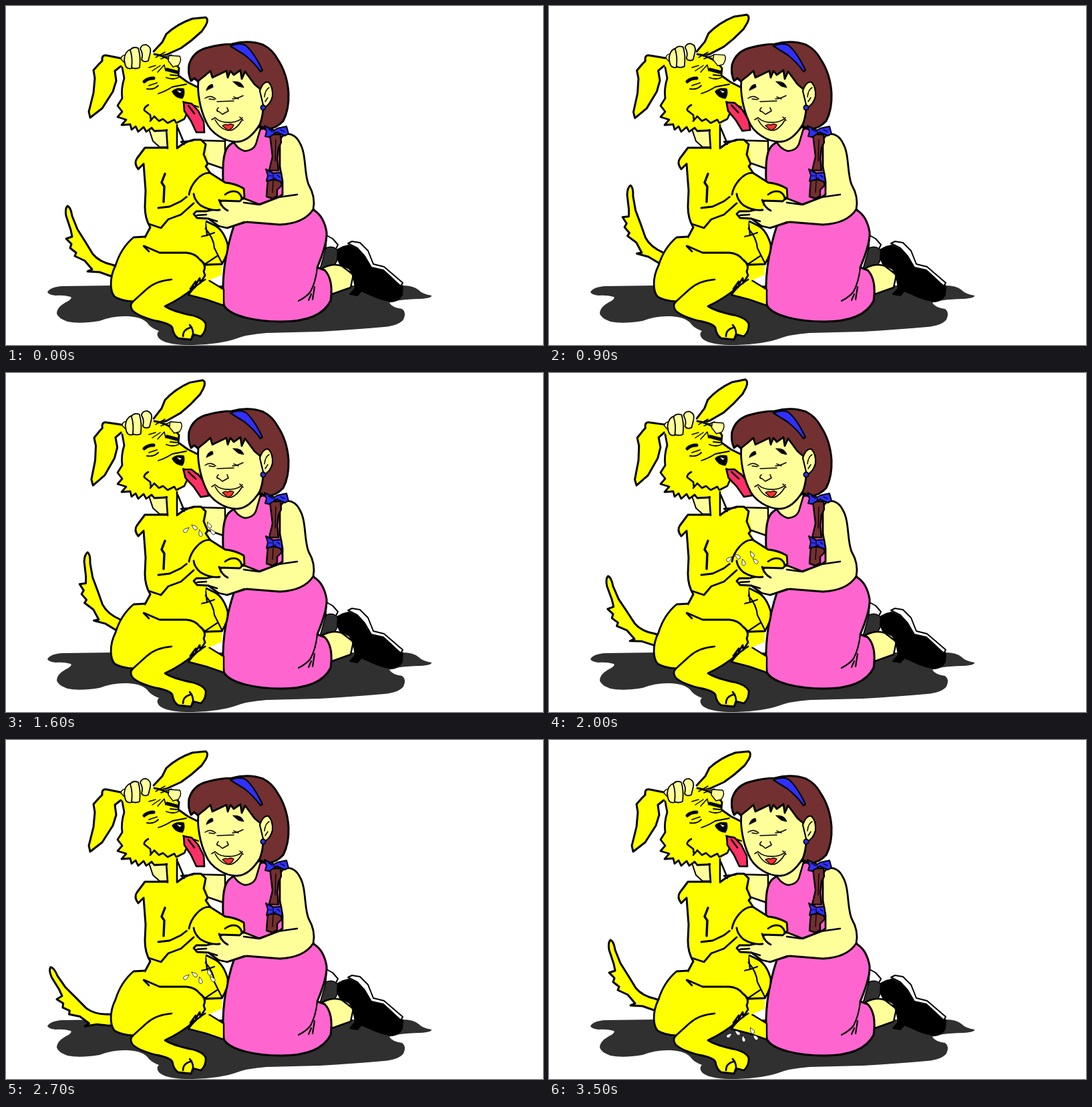
Animation of 804x507 px, one loop 3600 ms. Source, as an HTML page with a canvas:

```html
<!DOCTYPE html>
<html lang="en">
<head>
<meta charset="utf-8">
<title>Girl and dog</title>
<style>
html, body { margin: 0; width: 100%; height: 100%; overflow: hidden; background: #fff; }
canvas { display: block; }
</style>
</head>
<body>
<canvas id="stage" width="804" height="507"></canvas>
<script>
const ctx = document.getElementById('stage').getContext('2d');
const YELLOW = '#ffff00', SKIN = '#ffff9a', PINK = '#ff65cf', HAIR = '#733030';
const BLUE = '#3030ff', RED = '#ff3065', DARK = '#303030', WHITE = '#ffffff';

function fill(d, color) {
  ctx.fillStyle = color;
  ctx.fill(new Path2D(d));
}
function line(d, width = 2.6) {
  ctx.lineWidth = width;
  ctx.stroke(new Path2D(d));
}
function shape(d, color, width) {
  fill(d, color);
  line(d, width);
}
function turned(x, y, deg, draw) {
  ctx.save();
  ctx.translate(x, y);
  ctx.rotate(deg * Math.PI / 180);
  ctx.translate(-x, -y);
  draw();
  ctx.restore();
}
// Linear interpolation through [step, value] pairs
function track(keys, n) {
  for (let i = 1; i < keys.length; i++) {
    const [a, v] = keys[i - 1], [b, w] = keys[i];
    if (n <= b) return v + (w - v) * (n - a) / (b - a);
  }
  return keys[keys.length - 1][1];
}

const EAR = [[0, 0], [6, 2.4], [12, 3.6], [16, 4.8], [20, 5.6], [22, 6.2], [25, 0]];
const TONGUE = [[0, 0], [6, 4], [12, 8.5], [20, 10], [22, 10], [25, 0]];
const HAND = [[0, 0], [6, 2.5], [12, 3], [20, 0.5], [25, 0]];

function tailAngle(n) {
  if (n <= 12) return n * 1.31;
  if (n <= 18) return 15.7 - 8.7 * ((n - 12) / 6) ** 2;
  if (n <= 25) return 7 - 23.4 * (1 - ((25 - n) / 7) ** 1.37);
  return -1.64 * (35 - n);
}

function shadow() {
  fill('M62 428Q66 420 85 419L160 418H594Q610 418 618 425Q624 431 637 433Q638 437 620 438Q584 439 574 444Q578 451 593 453Q600 458 595 469Q588 478 566 480Q520 484 470 487L390 489Q360 491 340 499Q312 507 270 507Q238 506 229 497Q224 490 229 486Q220 483 214 477Q206 465 182 464Q160 463 140 471Q110 476 92 472Q78 467 76 460Q76 451 88 444Q100 438 97 435Q86 432 74 433Q64 432 62 428Z', DARK);
}

function tail() {
  shape('M190 398L159 387Q140 383 130 371L119 353L107 334L99 314Q97 301 92 299Q88 303 90 314L97 335L99 345L90 348L98 356L96 362L105 369L103 374L118 381L129 394L122 397L140 398L157 404L190 412', YELLOW, 3);
}

function shoes() {
  shape('M480 343L489 348L497 357L494 363L478 372Z', WHITE, 2);
  shape('M479 362Q490 357 497 366Q500 376 490 391L469 397Z', DARK, 1.5);
  shape('M474 392Q490 384 503 389L520 402L516 421L488 431Z', SKIN, 2.4);
  shape('M497 364L505 360L513 358L530 366L545 390L563 391L594 419L593 432Q588 441 578 442Q560 439 546 432L532 426L526 433L515 431L523 422Q520 400 514 393L500 386L496 377Z', '#000', 2);
  shape('M512 355L518 352L530 354L542 366L550 386L566 390L594 414L591 419L565 395L547 391L537 374L526 362Z', WHITE, 2);
}

function dress() {
  shape('M262 203L290 201L328 202V244L302 235L285 225Z', SKIN, 2.4);
  shape('M214 184L220 202L230 211H244V180Z', SKIN, 2);
  shape('M336 207C326 214 324 232 325 262L334 300L342 326C330 362 322 405 326 447C334 464 375 472 412 472C452 472 476 461 486 441C489 420 486 404 477 395L466 391C474 372 481 352 480 338Q476 315 462 306L440 280L412 195L385 183L360 190Z', PINK, 3);
  shape('M338 198Q345 214 358 217Q370 216 374 207L382 180Z', SKIN, 2.6);
  line('M466 391Q464 412 456 427Q450 435 438 441M453 440L457 431M462 420L459 439', 2.2);
}

function dogBody() {
  shape('M300 408Q285 416 273 432L300 439L326 448V424Z', YELLOW, 2.4);
  fill('M294 384L323 384V402L300 412Z', YELLOW);
  shape('M300 322L286 344Q276 357 279 371L299 387L323 386Q333 372 332 357Q326 336 314 329Z', YELLOW, 2.8);
  line('M299 326L301 343L287 346M301 343L312 339M298 332Q311 347 312 362L324 386M298 386L316 374', 2.2);
  fill('M207 212L195 231L198 244L205 237L208 262V300L215 330L207 346V360L240 372L281 370L298 332L305 250L299 207L288 199L257 212Z', YELLOW);
  line('M208 346L216 331Q208 318 208 300L209 276L206 236L198 244Q191 235 196 228L208 212H241M257 212Q268 203 281 200L292 200L299 207L296 222L302 236L299 240L306 250', 3);
  line('M238 251L233 264L237 270L236 293', 3.4);
  line('M214 326L232 332L243 319L262 312L281 295M228 302L245 300L262 292L276 281', 2.8);
  shape('M208 345L191 346Q172 362 164 388C154 408 156 428 163 435Q173 441 190 442Q184 448 190 456Q200 465 225 471Q246 475 249 481Q251 493 258 497L277 499L280 491L292 494Q300 486 299 475Q295 467 280 463Q250 457 238 449Q262 438 283 420L276 423L284 412V417L290 407L291 414L298 403L296 397Q301 387 290 379Q283 370 270 369L230 369L207 359', YELLOW, 2.8);
  line('M248 409Q224 411 210 424L189 443M206 359L214 367M265 494Q265 484 276 481M280 494Q281 483 275 477', 2.6);
}

function girlArm() {
  shape('M410 204C411 188 431 186 440 205C450 222 446 250 453 267C460 279 463 290 460 304C450 320 430 326 410 327L360 323L331 332L318 329L303 318L286 317L281 311L285 307L300 307L318 303L322 291L357 288L380 297L408 286L414 282L414 262L410 240Z', SKIN, 2.8);
  line('M436 282L408 286L378 297L356 294M303 318L316 322M286 313L300 312M357 323L331 332', 2.5);
}

function paw() {
  fill('M297 249L282 263L270 284L283 292Q284 299 295 303Q310 308 321 303L320 292L348 293L357 284L355 273L330 264L308 250Z', YELLOW);
  line('M274 282Q276 270 285 260Q296 248 306 250L328 264Q345 266 356 273L357 285L350 292L320 291M328 282Q337 275 346 278Q353 282 353 289M281 281Q282 290 291 298Q306 307 320 305M319 290Q323 302 332 306', 2.8);
}

function ears(n) {
  const a = track(EAR, n);
  turned(150, 76, -a / 1.8, () =>
    shape('M176 79L166 77L151 74Q143 72 144 82L139 87L131 96L133 108L131 130L124 158L126 167L144 153L160 128L165 112L163 97L172 90', YELLOW, 3));
  turned(222, 66, -a, () =>
    shape('M221 68L234 54L240 42Q256 27 279 19L299 17Q304 20 299 29L293 38L277 52L262 63L240 73L230 75', YELLOW, 3));
}

function dogHead(n) {
  fill('M222 170L240 186L242 214H257L255 190L262 165Z', YELLOW);
  line('M240 184L242 213M256 178V213M257 182L265 201', 2.6);
  ears(n);
  fill('M172 80L177 110L173 138L167 151L173 158L167 165L178 170L173 178L185 178L187 185L194 181L198 187L206 181L210 188L218 183L222 186L242 184L260 174L270 165H290V122L270 113L258 105L261 92L245 76L225 71L200 74Z', YELLOW);
  line('M174 92L177 108Q172 124 174 138L167 149L174 158L167 166L180 170L173 178L186 177L188 185L194 180L198 188L206 181L210 188L218 182L222 187M222 72Q247 76 259 93L258 104L272 114L288 122M222 187L241 186', 2.8);
  line('M216 172L222 165L229 172L235 169L242 175L252 170L255 175L267 169L271 160M213 148Q206 152 207 156L216 163L217 171', 2.6);
  line('M207 113Q212 108 221 108M241 95L256 99', 5);
  line('M211 124Q221 126 228 119M214 119L226 115M240 107Q250 111 258 107M246 103L256 104M228 131Q238 128 249 121L270 117', 1.8);
  shape('M249 128Q254 122 266 124Q268 132 264 138Q253 137 249 128Z', '#000', 1.5);
  fill('M256 126L263 128L260 130Z', WHITE);
  line('M214 92L224 89M219 97L231 89M227 99L236 89M239 97L237 88M224 77L238 69M232 79L248 73', 1.5);
  line('M265 143L288 151', 2);
  ctx.save();
  ctx.translate(track(HAND, n), -track(HAND, n) * 0.6);
  shape('M172 79Q173 73 181 73L188 85L180 88Z', SKIN, 1.4);
  shape('M244 74L260 75Q264 80 258 89L250 91L243 82Z', SKIN, 1.4);
  shape('M177 80Q178 68 186 65Q192 77 189 93Q180 96 178 86Z', SKIN, 1.8);
  shape('M186 66Q190 60 198 63Q202 76 200 92Q194 95 188 92Q190 78 186 66Z', SKIN, 1.8);
  shape('M201 64Q203 57 210 58Q218 61 216 70L213 82Q206 85 203 80Q206 72 201 64Z', SKIN, 1.8);
  ctx.restore();
  turned(267, 147, -track(TONGUE, n), () => {
    shape('M266 144L278 146L288 157L296 173L297 189L285 189L277 172L267 157Z', RED, 2.6);
    line('M273 149L282 161', 2.5);
  });
}

function girlHead() {
  shape('M277 112Q272 101 274 88Q280 67 303 62Q322 57 338 57Q363 50 385 58Q399 65 407 80Q421 101 423 130Q424 155 415 172Q404 184 390 184L376 178L360 130L300 108L295 107L290 115L282 108Z', HAIR, 3);
  shape('M288 112C286 130 291 155 299 172C306 190 328 204 347 203C362 202 372 190 380 177Q387 160 385 128L372 117L358 98L353 109L351 96L341 103L336 97L332 107L330 97L309 107L306 97L298 104Z', SKIN, 2.8);
  shape('M380 127Q385 112 393 114Q400 121 399 135Q396 148 386 152Z', SKIN, 2.2);
  line('M387 136Q388 125 394 122M388 143L392 137', 1.5);
  shape('M336 60Q350 54 359 59Q371 69 384 96L381 98Q371 84 357 73Z', BLUE, 2.2);
  ctx.fillStyle = BLUE;
  ctx.beginPath();
  ctx.arc(385, 152, 3.6, 0, 7);
  ctx.fill();
  ctx.lineWidth = 1.8;
  ctx.stroke();
  shape('M300 126Q302 118 309 117L310 121ZM340 113Q353 112 356 122L348 120Z', '#000', 1);
  line('M298 138Q306 132 314 139M339 139Q348 138 355 134M304 139L312 140M341 136L348 139M316 143L341 142', 1.5);
  line('M318 152Q313 157 319 158L324 162L333 157L331 152', 1.6);
  line('M308 170L313 167Q321 175 337 174Q349 173 354 167M313 170Q322 187 337 186Q346 183 353 171M350 166L355 171', 1.6);
  shape('M324 179Q329 176 332 178Q336 175 341 178Q338 185 332 186Z', '#ff3030', 1.3);
}

function braid() {
  shape('M395 192H411L412 204L408 212L406 228L408 246H394L399 225Z', HAIR, 2.4);
  shape('M392 260H411L413 268L406 275V284L399 288L390 285Z', HAIR, 2.4);
  line('M400 262L399 279M404 200L403 232', 1.3);
  shape('M387 179L401 186L406 183L420 180L423 191L418 194L405 189L394 196L388 195L390 188Z', BLUE, 2);
  shape('M389 244L400 250L412 249L414 264L402 259L390 262L392 253Z', BLUE, 2);
  line('M400 184L402 190L407 188M393 184L399 188M411 185L417 188M400 250V258L404 257M394 254H398M406 253L410 256', 1.2);
}

function drops(n) {
  if (n < 12) return;
  const y = 191 + 10.9 * (n - 12);
  const spots = [[270, 0, 50], [282, -4, -50], [291, 5, -15], [304, -7, -30], [309, 3, -45]];
  for (const [x, dy, deg] of spots) {
    ctx.save();
    ctx.translate(x, y + dy);
    ctx.rotate(deg * Math.PI / 180);
    shape('M0 -5Q4 2 2 4Q0 6 -2 4Q-4 2 0 -5Z', WHITE, 0.7);
    ctx.restore();
  }
}

function draw(n) {
  ctx.fillStyle = WHITE;
  ctx.fillRect(0, 0, 804, 507);
  ctx.strokeStyle = '#000';
  ctx.lineJoin = ctx.lineCap = 'round';
  shadow();
  turned(256, 429, tailAngle(n), tail);
  shoes();
  dress();
  dogBody();
  girlArm();
  paw();
  dogHead(n);
  girlHead();
  braid();
  drops(n);
}

function tick() {
  draw(Math.floor(performance.now() % 3600 / 100));
  requestAnimationFrame(tick);
}
tick();
</script>
</body>
</html>
```
